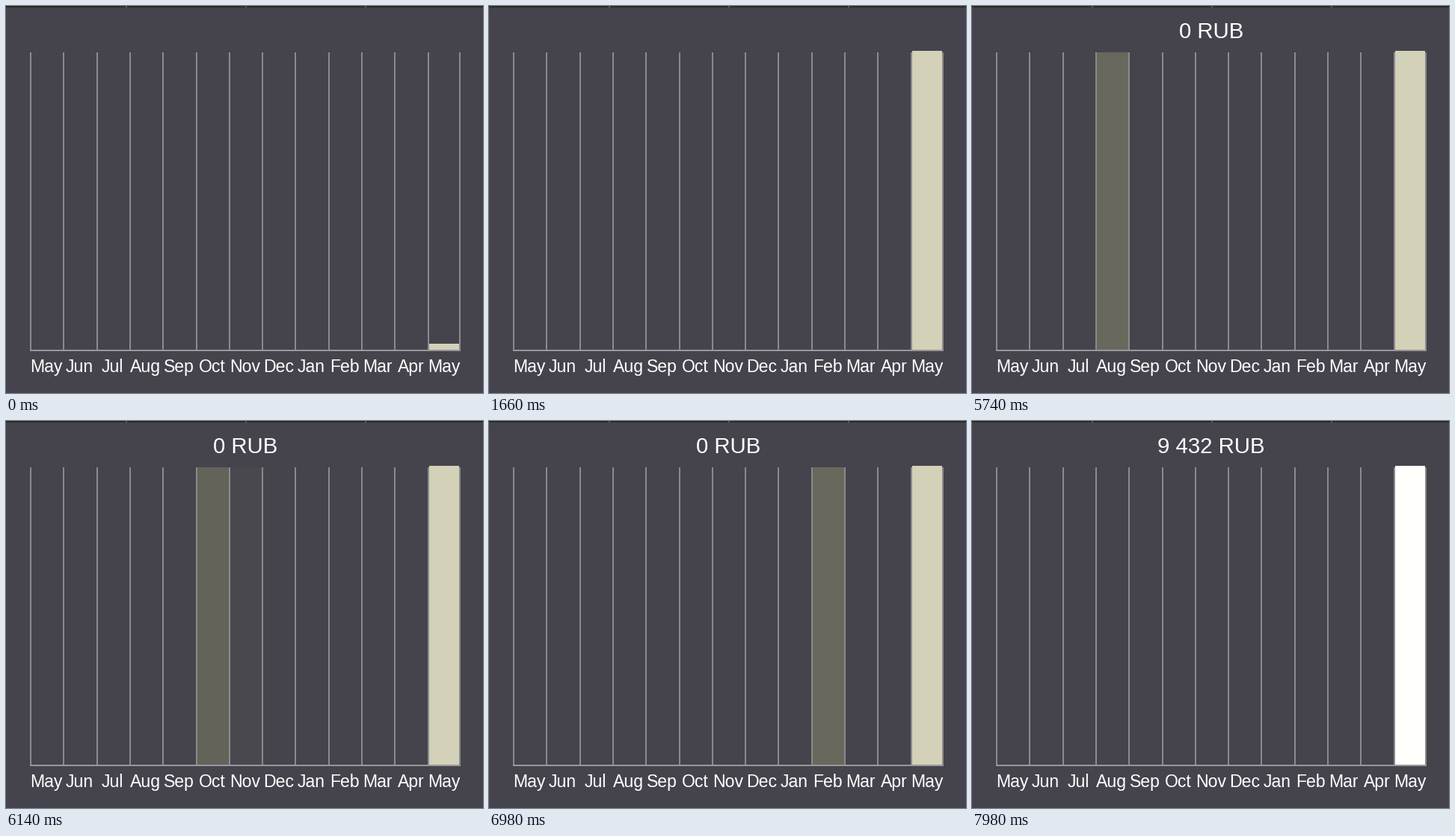
A matplotlib script for the animation above (8000 ms loop, 638 px wide and 518 px high).

```python
import matplotlib.pyplot as plt
import numpy as np
from matplotlib.animation import FuncAnimation
from matplotlib.colors import to_rgb
from matplotlib.patches import Rectangle

W, H, DPI = 638, 518, 100
STEP_MS, LOOP_MS = 20, 8000

BG, EDGE, TICK = "#45444d", "#2b2b1c", "#5c5c50"
GRID, AXIS = "#8b8a8c", "#98979c"
GLOW = "#69685c"
BAR, BAR_ON = np.array(to_rgb("#d3d1b8")), np.array(to_rgb("#fffffc"))

MONTHS = "May Jun Jul Aug Sep Oct Nov Dec Jan Feb Mar Apr May".split()
PITCH, LEFT, RIGHT = 44.31, 33, 607
TOP, BASE, BAR_TOP = 62, 460, 60
LAST = len(MONTHS) - 1

# Moment at which the finger enters each column
ENTER = [4880, 5065, 5250, 5460, 5740, 5920, 6110, 6300,
         6560, 6800, 7060, 7540, 7780]
FADE = 140

plt.rcParams["font.family"] = "Liberation Sans"
fig = plt.figure(figsize=(W / DPI, H / DPI), dpi=DPI, facecolor=BG)
ax = fig.add_axes([0, 0, 1, 1])
ax.set(xlim=(0, W), ylim=(H, 0))
ax.axis("off")


def box(x, y, w, h, color, z=1):
    patch = Rectangle((x, y), w, h, fc=color, ec="none", lw=0,
                      antialiased=False, zorder=z)
    return ax.add_patch(patch)


def label(x, y, text, px):
    return ax.text(x, y, text, color="white", ha="center", va="baseline",
                   fontsize=px * 72 / DPI, zorder=5)


def ease(t, start, length):
    p = min(max((t - start) / length, 0), 1)
    return p * p * (3 - 2 * p)


box(0, 0, W, 2, EDGE)
for x in (160, 320, 480):
    box(x, 0, 2, 2, TICK)

edges = [round(LEFT + PITCH * i) for i in range(LAST + 1)] + [RIGHT]
for x in edges:
    box(x - 1, TOP, 2, BASE - TOP, GRID, 3)
box(LEFT - 1, BASE, RIGHT - LEFT + 2, 2, AXIS, 3)

glows = [box(a, TOP, b - a, BASE - TOP, GLOW, 2)
         for a, b in zip(edges[:LAST], edges[1:])]
bar = box(edges[LAST] + 1, BASE, 40, 0, BAR, 4)

for i, name in enumerate(MONTHS):
    label(54 + PITCH * i, 490, name, 23)
title = label(320, 43, "", 29.4)


def draw(n):
    t = n * STEP_MS
    on = [ease(t, start, FADE) for start in ENTER]

    for i, glow in enumerate(glows):
        glow.set_alpha(on[i] * (1 - on[i + 1]))
        glow.set_visible(0 < on[i] and on[i + 1] < 1)

    height = (BASE - BAR_TOP) * ease(t, -75, 895)
    bar.set_y(BASE - height)
    bar.set_height(height)
    bar.set_facecolor(BAR + (BAR_ON - BAR) * on[LAST])

    title.set_text("9 432 RUB" if t >= ENTER[LAST] else "0 RUB")
    title.set_alpha(on[0])
    title.set_visible(on[0] > 0)
    return [*glows, bar, title]


anim = FuncAnimation(fig, draw, frames=LOOP_MS // STEP_MS, interval=STEP_MS,
                     repeat=True, repeat_delay=0)
plt.show()
```
